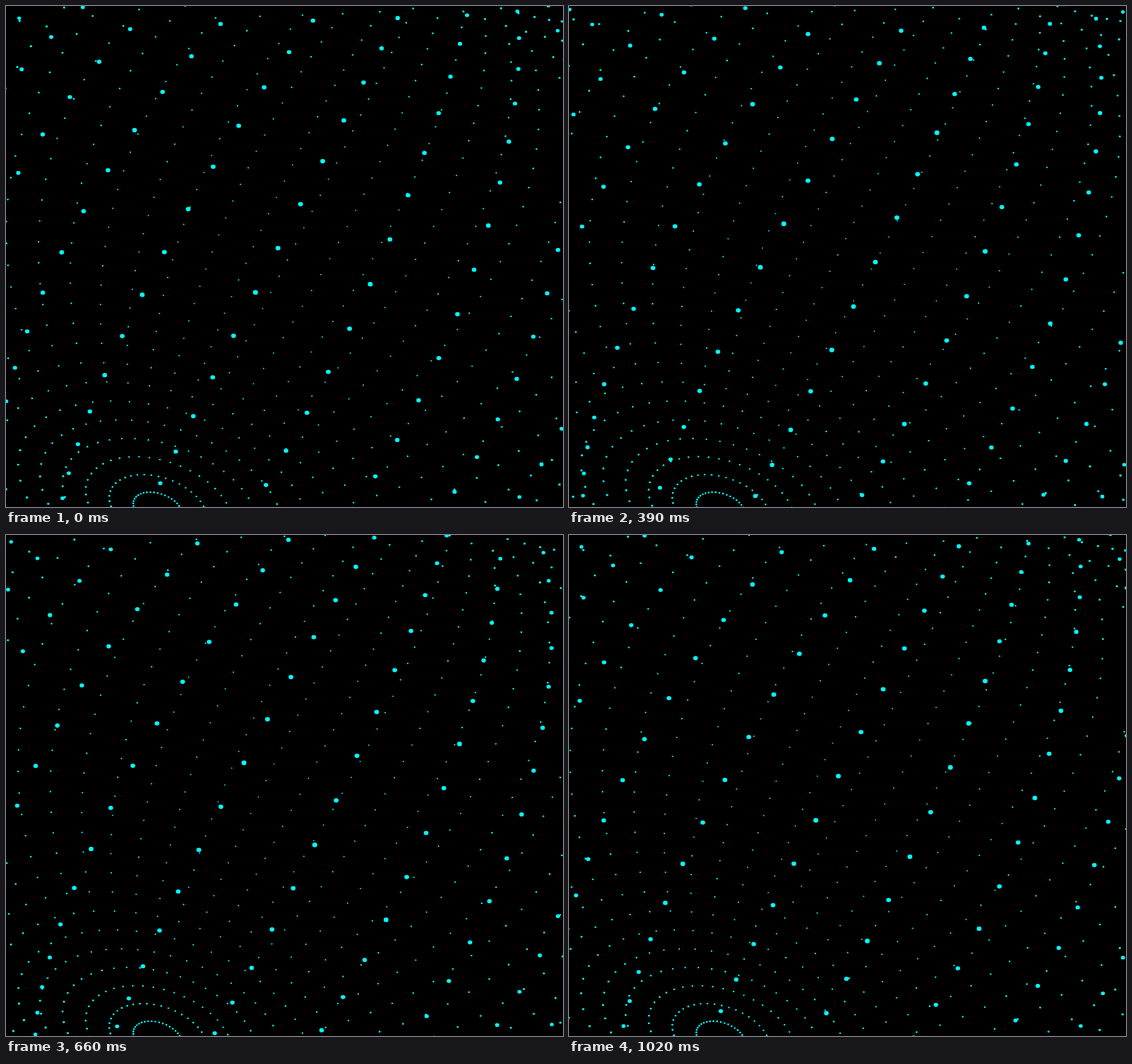
Write an HTML page that moves like this. It is 789 by 710 pixels and loops after 1050 ms.

```html
<!DOCTYPE html>
<html lang="en">
<head>
<meta charset="utf-8">
<title>Dotted sphere</title>
<style>
  html, body { margin: 0; width: 100%; height: 100%; overflow: hidden; background: #000; }
  svg { display: block; width: 789px; height: 710px; }
</style>
</head>
<body>
<svg viewBox="0 0 710 710" preserveAspectRatio="none">
  <rect width="710" height="710" fill="#000"/>
  <path id="dots" fill="#0ff"/>
</svg>
<script>
const RAD = Math.PI / 180;
const LOOP = 1050, STEP = 30;          // ms
const SIZE = 710, MID = 355.5;
const RINGS = 39, SPOKES = 40;
const FOCAL = 987, CAMERA = 2.15;      // sphere radius is 1
const START = -0.91 * RAD;
const ROLL = 24.4 * RAD, TILT = 15.65 * RAD;
const [rollSin, rollCos] = [Math.sin(ROLL), Math.cos(ROLL)];
const [tiltSin, tiltCos] = [Math.sin(TILT), Math.cos(TILT)];
const dots = document.getElementById('dots');

// Perspective view of a point given by its angle from the pole and its longitude.
function project(polar, lon) {
  const ring = Math.sin(polar), height = Math.cos(polar);
  const side = ring * Math.sin(lon), depth = ring * Math.cos(lon);
  const down = height * tiltCos + depth * tiltSin;
  const near = depth * tiltCos - height * tiltSin;
  const scale = FOCAL / (CAMERA - near);
  return {
    x: MID + scale * (side * rollCos - down * rollSin),
    y: MID + scale * (side * rollSin + down * rollCos),
    r: scale * 0.0042 - 0.48
  };
}

function circle({ x, y, r }) {
  const d = (2 * r).toFixed(2), a = r.toFixed(2);
  return `M${(x - r).toFixed(2)} ${y.toFixed(2)}a${a} ${a} 0 1 0 ${d} 0a${a} ${a} 0 1 0 -${d} 0z`;
}

const onStage = ({ x, y }) => x > -5 && x < SIZE + 5 && y > -5 && y < SIZE + 5;

function draw(time) {
  const turn = Math.floor((time % LOOP) / STEP) * STEP / LOOP;
  let path = '';
  for (let i = 1; i < RINGS; i++) {
    for (let j = 0; j < SPOKES; j++) {
      const dot = project(i * Math.PI / RINGS, START + (j + turn) * 2 * Math.PI / SPOKES);
      if (onStage(dot)) path += circle(dot);
    }
  }
  dots.setAttribute('d', path);
}

const begin = performance.now();
function tick() {
  draw(performance.now() - begin);
  requestAnimationFrame(tick);
}
tick();
</script>
</body>
</html>
```
